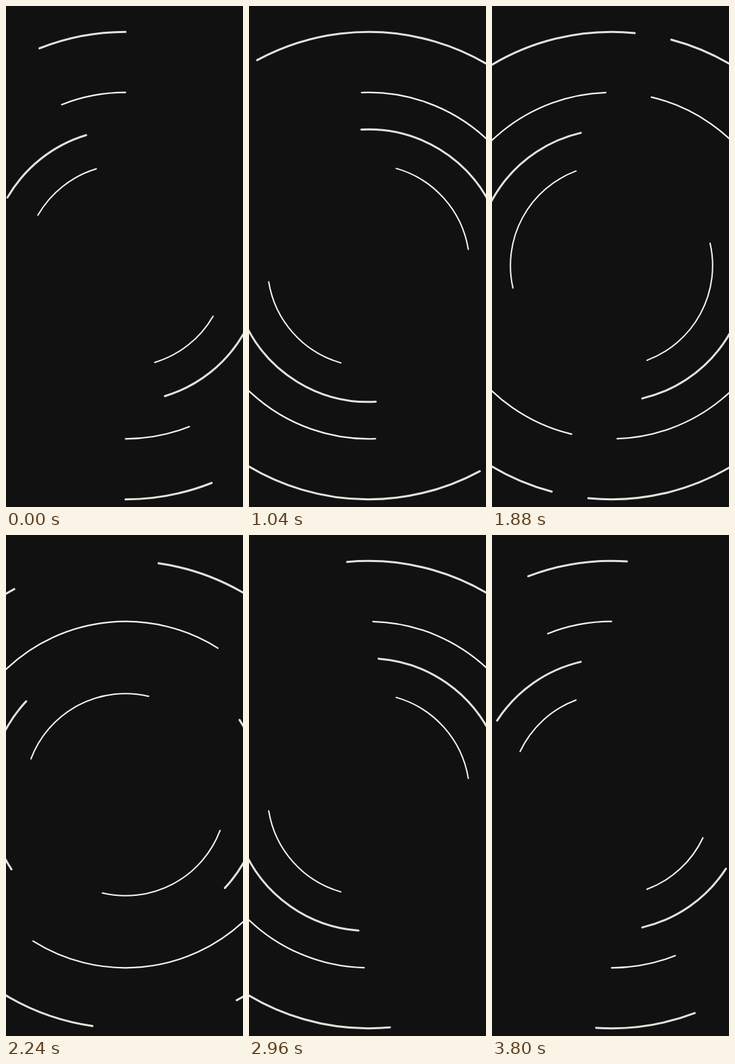
Animation, 350 px wide and 740 px high, one loop 3840 ms. Source, as an HTML page:

```html
<!DOCTYPE html>
<html lang="en">
<head>
<meta charset="utf-8">
<title>Orbiting arcs</title>
<style>
  html, body { margin: 0; width: 100%; height: 100%; overflow: hidden; background: #111; }
  svg { display: block; width: 350px; height: 740px; }
  circle { fill: none; stroke-linecap: round; }
</style>
</head>
<body>
<svg viewBox="0 0 350 740"></svg>
<script>
const LOOP = 3840, STEP = 40, PEAK = 2080;
const CX = 176.5, CY = 383.5;

// min/max: arc length in degrees; head: leading angle at time zero, clockwise from the top
const rings = [
  { r: 149.3, width: 2, color: '#f6f6f3', min: 43.2, max: 86.4, head: -16.8, span: 3840 },
  { r: 201.3, width: 3, color: '#e2e2de', min: 43.2, max: 86.4, head: -16.8, span: 3840, reverse: true },
  { r: 255.8, width: 2.2, color: '#f4f4f1', min: 21.6, max: 180, head: 0, span: 3800 },
  { r: 345.2, width: 3.1, color: '#e2e2de', min: 21.6, max: 180, head: 0, span: 3800, reverse: true }
];

const svg = document.querySelector('svg');

for (const ring of rings) {
  const el = document.createElementNS('http://www.w3.org/2000/svg', 'circle');
  const attrs = {
    cx: CX, cy: CY, r: ring.r, pathLength: 360,
    stroke: ring.color, 'stroke-width': ring.width
  };
  for (const name in attrs) el.setAttribute(name, attrs[name]);
  ring.el = svg.appendChild(el);
}

function pose(ring, time) {
  const t = Math.min(ring.reverse ? LOOP - time : time, ring.span);
  const grow = t < PEAK ? t / PEAK : (ring.span - t) / (ring.span - PEAK);
  const length = ring.min + (ring.max - ring.min) * grow;
  const head = ring.head + 360 * t / ring.span;
  // The dash pattern repeats every half turn, giving two opposite arcs.
  ring.el.setAttribute('stroke-dasharray', `${length} ${180 - length}`);
  ring.el.setAttribute('transform', `rotate(${head - length - 90} ${CX} ${CY})`);
}

const start = performance.now();

function draw() {
  const elapsed = (performance.now() - start) % LOOP;
  const time = Math.floor(elapsed / STEP) * STEP;
  for (const ring of rings) pose(ring, time);
  requestAnimationFrame(draw);
}

draw();
</script>
</body>
</html>
```
